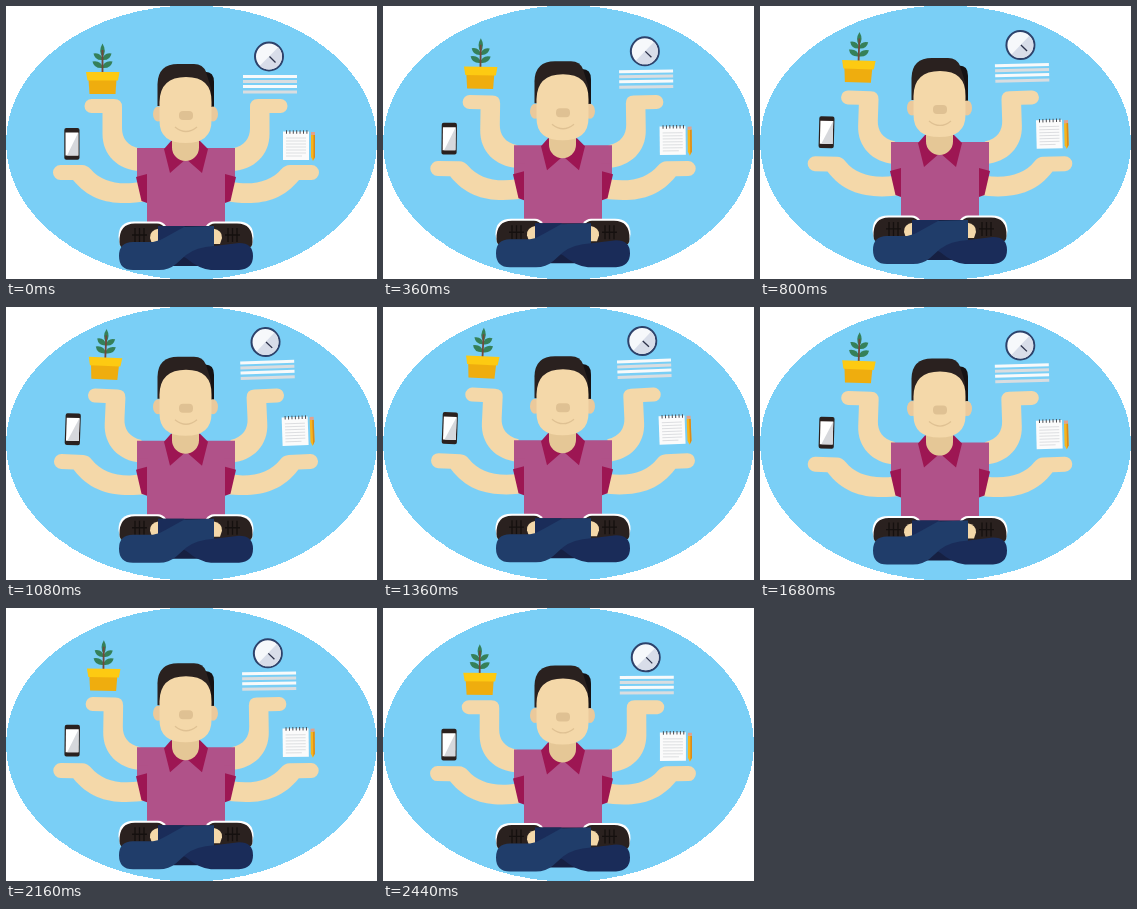
An HTML page for the animation above (2520 ms loop, 371 by 273 pixels).

```html
<!DOCTYPE html>
<html lang="en">
<head>
<meta charset="utf-8">
<title>Meditating multitasker</title>
<style>
  html, body { margin: 0; width: 100%; height: 100%; overflow: hidden; background: #fff; }
  svg { display: block; width: 371px; height: 273px; }
  .skin { fill: #f4d8a9; }
  .shirt { fill: #b05289; }
  .trim { fill: #9d1653; }
  .dark { fill: #2a211f; }
</style>
</head>
<body>
<svg viewBox="0 0 371 273">
  <ellipse cx="185.5" cy="136.5" rx="185.5" ry="137" fill="#7acff6" shape-rendering="crispEdges"/>

  <g id="body">
    <g id="arms" class="skin">
      <path id="upperArm" d="M85.5 93H108Q116 93 116 101V122C116 132 121 140 134 142.500V165C112 164 96.500 149 96.500 128V107H85.500a7 7 0 0 1 0-14Z"/>
      <path id="lowerArm" d="M54.500 159H76Q81 159 85 163.500C95 175 112 180 134 176L142 195C110 200 86 197 67 174H54.500a7.500 7.500 0 0 1 0-15Z"/>
    </g>
    <use href="#arms" transform="translate(360) scale(-1 1)"/>

    <path class="shirt" d="M131 142H229V165L219 170V222H141V170L131 165Z"/>
    <g id="sleeve">
      <path class="shirt" d="M131 160H142V170L131 172Z"/>
      <path class="trim" d="M130 171L141 168V197L135.500 195Z"/>
    </g>
    <use href="#sleeve" transform="translate(360) scale(-1 1)"/>

    <path class="trim" d="M165 135L158 143L164 167L180 153L196 167L202 143L194 135Z"/>
    <path fill="#e5c796" d="M166 130H193V141.500a13.500 13.500 0 0 1-27 0Z"/>
    <path fill="#151214" d="M196 66Q208 64 208 76V101H200Z"/>
    <path class="dark" d="M151.500 100V78Q152 58 172 58H188Q197 58 200 66L205 82V100Z"/>
    <g fill="#ebc99b">
      <ellipse cx="152" cy="108" rx="5" ry="7.500"/>
      <ellipse cx="207" cy="108" rx="5" ry="7.500"/>
    </g>
    <path class="skin" d="M153.500 96Q154 71 180 71T205.500 96V115Q205.500 137 179.500 137T153.500 115Z"/>
    <rect x="173" y="105" width="14" height="9" rx="4" fill="#dfc193"/>
    <path d="M169 121Q180 130 191 121" fill="none" stroke="#dfc193" stroke-width="1.300"/>

    <g id="shoe">
      <path fill="#fff" d="M112.500 231Q112.500 215.500 128 215.500H152Q157 215.500 160 220V240H114Z"/>
      <path class="dark" d="M113.500 236Q113 217.500 129 217.500H151Q156 217.500 159 222V242H119Q113.500 242 113.500 236Z"/>
      <path class="skin" d="M153 222.500Q143.500 224 144 232L146 238H153Z"/>
      <path d="M129 222V236M133.500 222V236M138 222V236M126 229H141" stroke="#15100f" stroke-width="1.300"/>
    </g>
    <use href="#shoe" transform="translate(360) scale(-1 1)"/>

    <path fill="#162042" d="M152 220H208V260H152Z"/>
    <path fill="#1a2c59" d="M152 220H178L208 240L233 237Q247 237 247 250T233 264H205Q193 263 180 252L152 239Z"/>
    <path fill="#203d6a" d="M208 220V240Q190 241 180 249L170 258Q163 264 153 264H127Q113 264 113 250T127 236H147Q154 235 160 231L178 221Z"/>
  </g>

  <g id="plant">
    <g fill="#358059">
      <path d="M96.500 37.500Q101 45 96.500 51Q92 45 96.500 37.500Z"/>
      <g id="leaves">
        <path d="M97 54Q89 55 87.500 47.500Q95 46 97 54Z"/>
        <path d="M97 62Q88 63 86.500 55.500Q95 54 97 62Z"/>
      </g>
      <use href="#leaves" transform="translate(193) scale(-1 1)"/>
    </g>
    <path d="M96.500 44V67" stroke="#72483b" stroke-width="1.800"/>
    <path fill="#efad0e" d="M82.500 73H110.500L109.500 88H83.500Z"/>
    <path fill="#fdca12" d="M80 66H113.500L112 74.500H81.500Z"/>
  </g>

  <g id="phone">
    <rect class="dark" x="58.300" y="122" width="15.200" height="31.700" rx="2"/>
    <path fill="#fff" d="M59.500 126.500H72.300V149.500H59.500Z"/>
    <path fill="#d6d8dc" d="M72.300 126.500V149.500H61Z"/>
  </g>

  <g id="clock">
    <circle cx="263" cy="50.500" r="14" fill="#f6f8fb" stroke="#2d426b" stroke-width="2"/>
    <path fill="#d8dde9" d="M272.200 41.300A13 13 0 0 1 253.800 59.700Z"/>
    <path d="M263.500 50.500L269.500 56.500" stroke="#2b3048" stroke-width="1.300"/>
    <path d="M237 70.500H291M237 80.500H291" stroke="#f8fafb" stroke-width="3"/>
    <path d="M237 75.500H291M237 86H291" stroke="#d9dde0" stroke-width="3"/>
  </g>

  <g id="notes">
    <path fill="#fbfbfb" d="M277 125.500H303V154H277Z"/>
    <path d="M280 126H302" stroke="#4b4b50" stroke-width="3.500" stroke-dasharray="1 2.400"/>
    <path d="M280 132H300M280 135H300M280 138H300M280 141H300M280 144H300M280 147H300M280 150H296" stroke="#d5d7da" stroke-width=".8"/>
    <path fill="#f7b51b" d="M305 129H309V151L307 155L305 151Z"/>
    <path fill="#d9891c" d="M307.500 129H309V151L307.500 154Z"/>
    <path fill="#e4a08b" d="M305 126H309V129H305Z"/>
  </g>
</svg>
<script>
const LOOP = 2520, STEP = 40, LAST_STEP = 61;
const place = (id, transform) => document.getElementById(id).setAttribute("transform", transform);

// Floating props: x drift, y lift, tilt, then the tilt's centre
const props = {
  plant: [3.4, -18.2, 3, 97, 64],
  phone: [1, -18.2, 2.3, 66, 138],
  clock: [-3.6, -18, -2.3, 264, 62],
  notes: [-1, -18.2, -2.3, 293, 140]
};

function draw(now) {
  const step = Math.min(Math.floor(now % LOOP / STEP), LAST_STEP);
  const rise = 1 - Math.abs(1 - 2 * step * STEP / LOOP);
  place("body", `translate(0 ${-9.6 * rise})`);
  place("upperArm", `rotate(${3 * rise} 162 176)`);
  place("lowerArm", `rotate(${3 * rise} 138 186)`);
  for (const [id, [dx, dy, tilt, cx, cy]] of Object.entries(props))
    place(id, `translate(${dx * rise} ${dy * rise}) rotate(${tilt * rise} ${cx} ${cy})`);
}

const start = performance.now();
function tick() {
  draw(performance.now() - start);
  requestAnimationFrame(tick);
}
tick();
</script>
</body>
</html>
```
